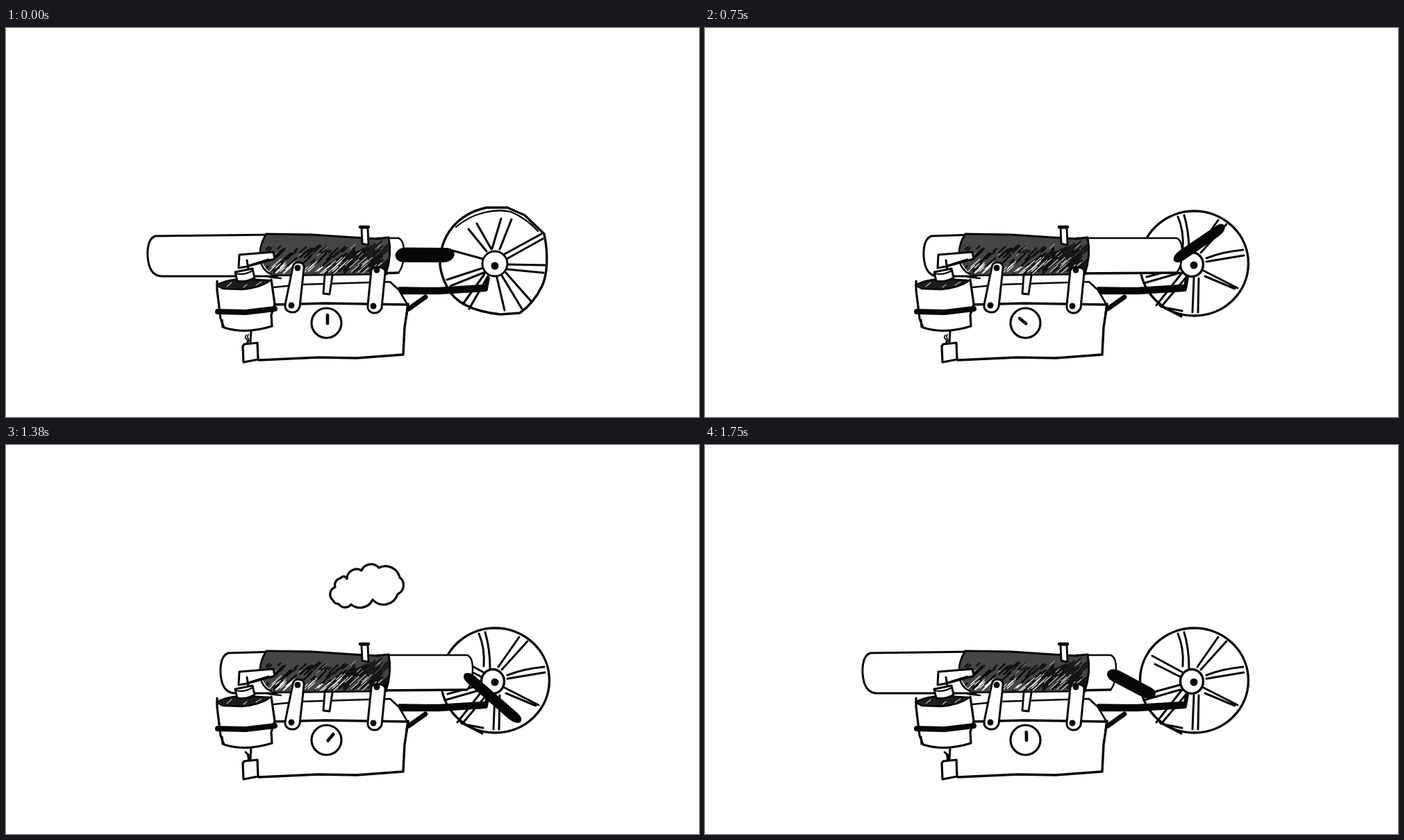
Write an HTML page with a canvas that moves like this. It is 998 px wide and 561 px high and loops after 1.92 s.

```html
<!DOCTYPE html>
<html lang="en">
<head>
<meta charset="utf-8">
<title>Hot air engine</title>
<style>
html, body { margin: 0; width: 100%; height: 100%; overflow: hidden; background: #fff; }
canvas { display: block; }
</style>
</head>
<body>
<canvas id="stage" width="998" height="561"></canvas>
<script>
const ctx = document.getElementById('stage').getContext('2d');
const INK = '#060606', LOOP = 1920, POSES = 15, PEN = 1.15;

// One value per pose
const tubeLeft = [203, 210, 225, 245, 266, 292, 314, 340, 355, 355, 343, 308, 266, 246, 226];
const tubeRight = [573, 588, 606, 629, 648, 668, 687, 705, 717, 711, 695, 672, 648, 620, 592];
const crankAngle = [191, 206, 222, 238, 255, 280, 306, 328, 349, 370, 391, 422, 453, 488, 521];
const needleAngle = [-90, -115, -155, -195, -227, -180, -140, -137, -135, -80, -26, -50, -80, -86, -91];

function path(d, width = 3, fill = null, color = INK) {
  const p = new Path2D(d);
  if (fill) { ctx.fillStyle = fill; ctx.fill(p); }
  if (width) { ctx.lineWidth = width * PEN; ctx.strokeStyle = color; ctx.stroke(p); }
}

function oval(x, y, rx, ry = rx, width = 3, fill = null) {
  ctx.beginPath();
  ctx.ellipse(x, y, rx, ry, 0, 0, 7);
  if (fill) { ctx.fillStyle = fill; ctx.fill(); }
  if (width) { ctx.lineWidth = width * PEN; ctx.strokeStyle = INK; ctx.stroke(); }
}

const dot = (x, y, r) => oval(x, y, r, r, 0, INK);

function randomizer(seed) {
  return () => (seed = seed * 16807 % 2147483647) / 2147483647;
}

function drawWheel(pose) {
  if (pose === 0) {
    path('M625 342C624 300 650 268 692 259L722 259L747 270L775 297C781 325 780 355 772 372Q760 397 740 411L712 413C675 409 646 397 635 373Q627 358 625 342Z');
    path('M648 287C672 266 705 260 727 265Q750 275 766 293', 2);
    path('M666 290L692 322M678 282L699 319M713 275L700 318M728 276L711 319M771 297L718 326M773 304L721 333M722 341L776 342M722 348L774 353M720 353L757 395M714 357L743 405M707 360L718 407M694 358L667 405M689 355L658 398', 2.7);
    path('M643 321L687 333M635 363L687 346M640 372L690 352', 2.7);
    oval(704, 340, 18, 18, 2.5, '#fff');
    dot(704, 343, 5.5);
  } else {
    oval(704.5, 339.5, 78, 75.5);
    path('M681 272Q690 293 688 319M690 270Q697 293 697 322M739 277L709 320M751 283L714 324M775 320Q744 323 722 332M776 328L722 337M718 350L767 375M720 358L763 376M704 361L702 410M711 361L710 410M687 353L650 400M695 357L657 402M636 359L684 346M632 368L684 353M644 304L688 328M648 316L684 334', 2.6);
    path('M655 400L686 416M666 404L687 408', 2.8);
    oval(701, 341, 16.5, 17.5, 3, '#fff');
    dot(704, 342, 5.5);
  }
}

function drawTube(pose) {
  const l = tubeLeft[pose], r = tubeRight[pose];
  const slant = pose === 4 || pose === 12;
  const left = slant
    ? `M390 299L${l + 26} 303C${l + 15} 309 ${l + 4} 330 ${l} 343Q${l + 1} 353 ${l + 12} 356`
    : `M390 298L${l + 12} 300C${l} 304 ${l - 1} 326 ${l + 3} 342Q${l + 8} 358 ${l + 22} 358`;
  path(left + 'L390 358', 2.6, '#fff');
  const right = `M535 303L${r - 8} 303Q${r} 306 ${r} 322Q${r} 344 ${r - 8} 353`;
  path(right + 'L535 355', 0, '#fff');
  path(right, 2.1);
  path(`M535 354L${r - 8} 353`, 3);
}

function drawBody() {
  const shape = 'M375 297L440 298L500 302L535 304L551 302Q556 327 547 355L384 356Q364 340 366 318Q367 304 375 297Z';
  path(shape, 0, '#454545');
  ctx.save();
  ctx.clip(new Path2D(shape));
  const rnd = randomizer(77);
  const hatch = (count, x0, y0, w, h, size, width, color) => {
    let d = '';
    for (let i = 0; i < count; i++) {
      const x = x0 + rnd() * w, y = y0 + rnd() * h, s = size * (0.5 + rnd());
      d += `M${x} ${y}l${s} ${-s * 0.9}`;
    }
    path(d, width, null, color);
  };
  hatch(60, 365, 330, 185, 28, 9, 2, INK);
  hatch(45, 460, 328, 85, 24, 12, 2.4, '#141414');
  hatch(40, 372, 318, 150, 8, 4, 2.2, '#111');
  hatch(14, 520, 312, 30, 20, 8, 2, '#1a1a1a');
  hatch(38, 368, 345, 110, 12, 9, 1.1, '#eee');
  hatch(16, 470, 338, 75, 18, 9, 0.9, '#ddd');
  hatch(9, 380, 314, 160, 18, 5, 0.8, '#ccc');
  ctx.restore();
  path('M375 297L440 298L500 302L535 304L551 302Q556 327 547 355', 2.6);
  path('M375 297Q364 313 366 334Q369 350 382 355M378 359L396 361M384 357L548 355', 2.2);
}

function drawBase(pose) {
  path('M385 399L460 397L579 399L574 432L572 471L505 476L450 475L364 479');
  path('M385 374L425 370L553 366L566 378L577 397', 2.3);
  path('M459 357L457 383L466 384L470 357', 2.5, '#fff');
  path('M604 388L580 405', 6);
  path('M579 398L577 412', 3);
  oval(461.5, 425.5, 21.5, 21.5, 2.8, '#fff');
  const a = needleAngle[pose] * Math.PI / 180, c = Math.cos(a), s = Math.sin(a);
  path(`M${463 + c} ${427 + s}L${463 + c * 13} ${427 + s * 13}`, pose === 10 ? 2.5 : 4);
}

function drawLinks() {
  path('M413 345Q414 338 421 338Q430 338 429 347L423 402Q420 411 411 410Q401 408 402 399Z', 2.6, '#fff');
  path('M526 350Q528 344 536 345Q547 345 546 353L541 404Q537 412 529 411Q520 409 521 400Z', 2.6, '#fff');
  dot(420, 346, 4.5); dot(411, 400, 4.5);
  dot(534, 349, 4.5); dot(529, 401, 4.5);
}

function drawBoiler(pose) {
  path('M303 370L311 431Q345 443 383 430L387 400L382 363Z', 0, '#fff');
  path('M336 327L385 323L387 333L347 344L335 346Z', 2.6, '#fff');
  path('M347 335L349 348M349 343L378 334', 2.6);
  path('M303 371Q318 362 345 362L381 364Q366 375 340 377L312 376Z', 2, '#1c1c1c');
  path('M318 373l7-6M360 371l8-5M342 374l5-4', 1, null, '#bbb');
  path('M330 352L355 347L358 360Q347 367 333 365Z', 2.6, '#fff');
  path('M331 354Q343 357 355 350', 2);
  path('M304 365L304 378L309 419L314 432Q345 442 383 430L382 414L387 398L382 363M311 421L312 431', 2.8);
  path('M305 409L345 410L387 405', 7);
  path('M353 437L352 453', 2.6);
  path('M341 459L343 456L362 454L363 478L342 482Z', 2.8, '#fff');
  const flames = [
    ['M346 443q-3 4 1 6q2 3-1 6M349 442q-2 4 0 6q2 3-1 6', 1.5],
    ['M347 442L351 449L350 455M354 445L350 450', 3],
    ['M345 443Q350 446 349 455M349 446Q352 450 352 454', 2.4]
  ];
  path(flames[pose % 3][0], flames[pose % 3][1]);
}

function drawSteam(pose) {
  const cloud = 'M471 241A11 11 0 0 1 474 222A10 10 0 0 1 482 209A5 5 0 0 1 491 210A14 14 0 0 1 512 198A15 15 0 0 1 537 194A21 21 0 0 1 567 208A14 14 0 0 1 564 232A21 21 0 0 1 528 240A20 20 0 0 1 497 247A11 11 0 0 1 479 246A8 8 0 0 1 471 241Z';
  if (pose === 8) {
    path('M511 285L509 274C500 270 502 257 508 262C508 254 516 253 517 260C518 251 530 249 527 257C527 268 522 273 521 285', 1.9, '#fff', '#555');
  }
  if (pose === 9 || pose === 10) path('M511 260L512 285M515 254L515 284M518 256L521 285', 2, null, '#333');
  if (pose < 9 || pose > 11) return;
  ctx.save();
  if (pose === 9) {
    ctx.translate(516, 262);
    ctx.scale(0.6, 0.6);
    ctx.translate(-518, -248);
  } else if (pose === 11) ctx.translate(0, -17);
  path(cloud, 2.8, '#fff');
  ctx.restore();
}

function drawChimney() {
  path('M512 288L513 311L522 313L521 288Z', 2.5, '#fff');
  path('M510 287L522 287', 4);
}

function drawRod(pose) {
  const a = crankAngle[pose] * Math.PI / 180;
  const x1 = tubeRight[pose] - 9, y1 = 327 + 7 * Math.sin(pose / POSES * Math.PI);
  const x2 = 707 + 66 * Math.cos(a), y2 = 340 + 65 * Math.sin(a);
  const w = pose === 0 ? 10 : pose === 1 || pose === 14 ? 8.5 : 6.8;
  const len = Math.hypot(x2 - x1, y2 - y1);
  ctx.save();
  ctx.translate(x1, y1);
  ctx.rotate(Math.atan2(y2 - y1, x2 - x1));
  path(`M-3 0Q0 ${-w} 12 ${-w}L${len - 9} ${-w}Q${len + 3} ${-w} ${len + 3} 0Q${len} ${w} ${len - 14} ${w}L9 ${w}Q-2 ${w} -3 0Z`, 1, INK);
  ctx.restore();
}

function draw(pose) {
  ctx.fillStyle = '#fff';
  ctx.fillRect(0, 0, 998, 561);
  ctx.lineCap = ctx.lineJoin = 'round';
  drawWheel(pose);
  path('M571 379L623 379L689 375', 9);
  path('M566 375L612 376', 3);
  path('M694 361L691 377', 5);
  drawTube(pose);
  drawBase(pose);
  drawBody();
  drawSteam(pose);
  drawChimney();
  drawLinks();
  drawBoiler(pose);
  drawRod(pose);
}

let shown = -1;
function tick() {
  const t = performance.now() % LOOP;
  // Poses change every 125 ms, rounded up to 10 ms on odd steps
  let pose = 0;
  while (pose < POSES - 1 && t >= Math.ceil((pose + 1) * 12.5) * 10) pose++;
  if (pose !== shown) draw(shown = pose);
  requestAnimationFrame(tick);
}
tick();
</script>
</body>
</html>
```
